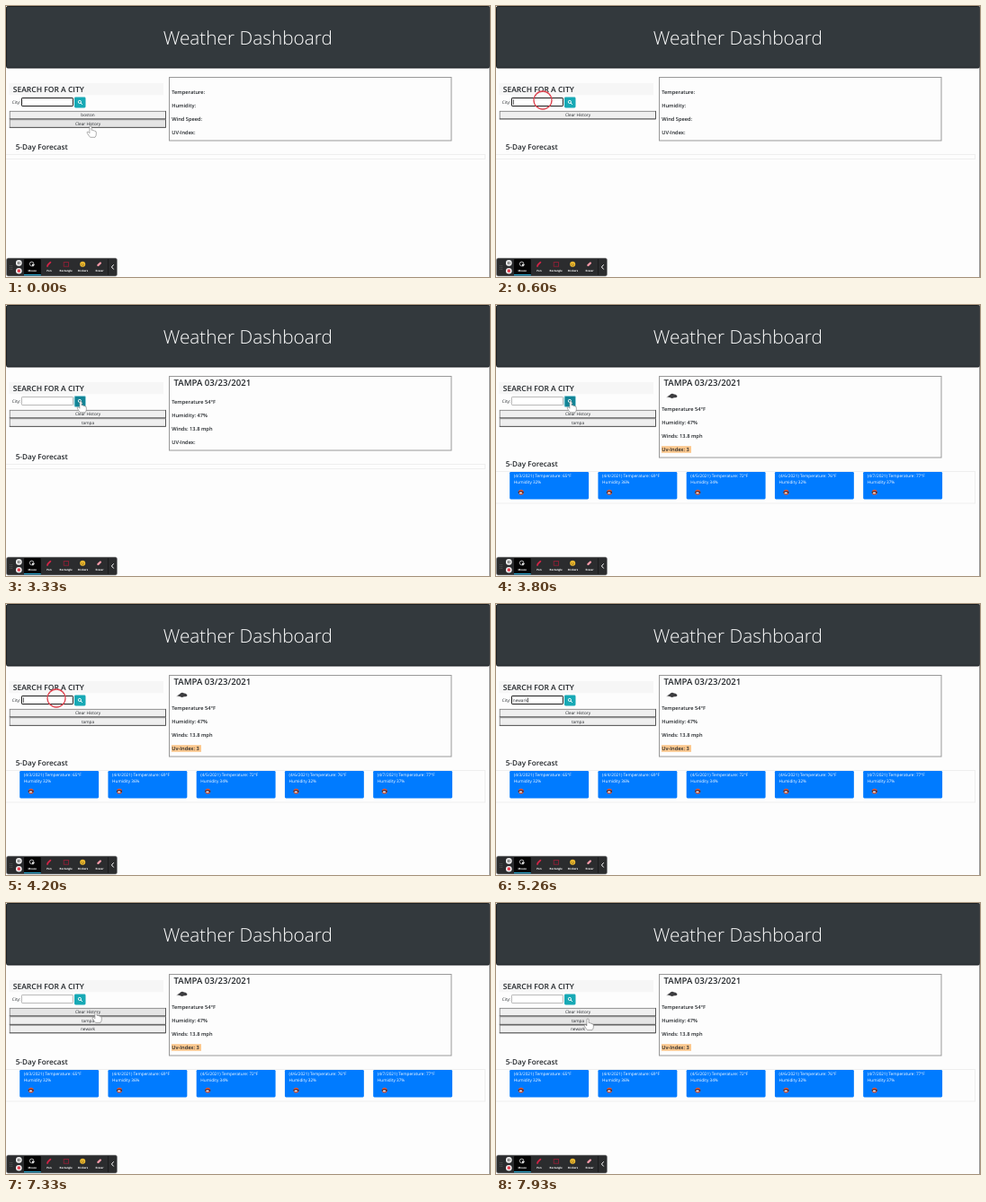
Write an HTML page that moves like this. It is 538 px wide and 302 px high and loops after 8 s.

```html
<!DOCTYPE html>
<html lang="en">
<head>
<meta charset="utf-8">
<title>Weather Dashboard</title>
<style>
  html, body { margin: 0; width: 100%; height: 100%; overflow: hidden; background: #fdfdfd; }
  svg { display: block; }
  text { font-family: "Open Sans", "Noto Sans", sans-serif; text-rendering: geometricPrecision; white-space: pre; }
</style>
</head>
<body>
<svg id="stage" width="538" height="302" viewBox="0 0 538 302"></svg>
<script>
const LOOP = 8000;
const INK = '#212529';
const stage = document.getElementById('stage');

function el(parent, tag, attrs = {}, content) {
  const node = document.createElementNS('http://www.w3.org/2000/svg', tag);
  for (const k in attrs) node.setAttribute(k, attrs[k]);
  if (content !== undefined) node.textContent = content;
  return parent.appendChild(node);
}
const group = (parent = stage) => el(parent, 'g');
const rect = (p, x, y, width, height, fill, more) => el(p, 'rect', { x, y, width, height, fill, ...more });
const circle = (p, cx, cy, r, fill, more) => el(p, 'circle', { cx, cy, r, fill, ...more });
const path = (p, d, fill, more) => el(p, 'path', { d, fill, ...more });
const text = (p, x, y, size, str, weight = 400, fill = INK, anchor = 'start') =>
  el(p, 'text', { x, y, 'font-size': size, 'font-weight': weight, fill, 'text-anchor': anchor }, str);
const line = (p, d, stroke, width) =>
  path(p, d, 'none', { stroke, 'stroke-width': width, 'stroke-linecap': 'round', 'stroke-linejoin': 'round' });
const show = (node, on) => node.setAttribute('visibility', on ? 'visible' : 'hidden');

// Header and search form
rect(stage, 0, 0, 538, 302, '#fdfdfd');
rect(stage, 0.5, 0.5, 537, 68.5, '#33393d', { rx: 1.6, stroke: '#1b1f22' });
text(stage, 268.8, 43, 20.8, 'Weather Dashboard', 300, '#fff', 'middle');
rect(stage, 3.5, 86, 171.5, 13.3, '#f6f6f6');
text(stage, 7.8, 96, 8.5, 'SEARCH FOR A CITY', 600);
text(stage, 6.8, 109, 4.7, 'City:');
const input = rect(stage, 17.5, 102.5, 57, 9, '#fff', { rx: 0.6 });
const typed = text(stage, 18.8, 108.8, 4.7, '');
const caret = rect(stage, 0, 104.3, 0.6, 5.6, '#000');
const search = rect(stage, 76, 101.5, 12.5, 12, '#17a9b5', { rx: 1.4 });
circle(stage, 81.9, 106.9, 1.6, 'none', { stroke: '#fff', 'stroke-width': 0.9 });
line(stage, 'M83.2 108.2L84.6 109.6', '#fff', 1);

// History buttons
const rows = [0, 1, 2].map(i => {
  const g = group();
  const y = 117.3 + i * 9.45;
  const box = rect(g, 4.2, y, 173.3, 8.6, '#efefef', { stroke: '#777', 'stroke-width': 0.8 });
  line(g, `M4.2 ${y + 8.6}H177.5V${y}`, '#4a4a4a', 0.8);
  return { g, y, box, label: text(g, 91, y + 6, 4.7, '', 400, INK, 'middle') };
});

// Weather panel and forecast, one group per loading stage
function weather(dy, title, labels, loaded) {
  const g = group();
  rect(g, 181.5, 79.5, 313.5, 70.5 + dy, '#fdfdfd', { stroke: '#999' });
  text(g, 186.6, 89.6, 9.6, title, 600);
  if (loaded) {
    rect(g, 184, 157.2, 33, 7.6, '#fcc88e');
    el(g, 'ellipse', { cx: 191.6, cy: 103, rx: 2.8, ry: 1.4, fill: '#eee' });
    path(g, 'M190 102.2Q192 101.2 193.5 100Q195.5 98 198 99.4Q201.6 99.8 201.4 102.2Q200.5 103.6 198 103.2Q195 104.8 194 103.2Z', '#3d3d40');
  }
  labels.forEach((s, i) => text(g, 184.2, 98.4 + dy + i * 15, 5.7, s, 600));
  text(g, 10.7, 160 + dy, 8.2, '5-Day Forecast', 600);
  rect(g, -1, 165.5 + dy, 533.5, loaded ? 35.5 : 5, 'none', { stroke: '#efefef' });
  return g;
}

function card(g, i, temp, humidity) {
  const x = 15.2 + i * 98.25;
  rect(g, x, 186, 87.9, 30.4, '#007bff', { rx: 1.3 });
  text(g, x + 4.6, 191.8, 4.7, `(4/${i + 3}/2021) Temperature: ${temp}°F`, 400, '#fff');
  text(g, x + 4.6, 199, 4.7, `Humidity ${humidity}%`, 400, '#fff');
  circle(g, x + 12.6, 208.7, 2.9, '#e8562f');
  el(g, 'ellipse', { cx: x + 12.5, cy: 208.8, rx: 3.1, ry: 1.5, fill: '#4a2b35' });
  el(g, 'ellipse', { cx: x + 12.3, cy: 209.3, rx: 1.8, ry: 0.9, fill: '#f3e6e2' });
}

const readings = ['Temperature 54°F', 'Humidity: 47%', 'Winds: 13.8 mph'];
const city = 'TAMPA 03/23/2021';
const panels = [
  weather(0, '', ['Temperature:', 'Humidity:', 'Wind Speed:', 'UV-Index:']),
  weather(12, city, [...readings, 'UV-Index:']),
  weather(20, city, [...readings, 'Uv-Index: 3'], true)
];
[[65, 32], [69, 36], [72, 34], [76, 32], [77, 37]].forEach((d, i) => card(panels[2], i, ...d));

// Recorder toolbar
const bar = group();
rect(bar, 0.5, 281, 123, 20, '#2b2c2e', { rx: 2, stroke: '#8a8a8a', 'stroke-width': 0.6 });
for (let i = 0; i < 6; i++) circle(bar, 4.8 + (i % 2) * 1.6, 289.4 + (i >> 1) * 1.9, 0.4, '#999');
circle(bar, 14.3, 286.4, 3.3, '#f4f4f4');
line(bar, 'M13.4 285.2V287.6M15.2 285.2V287.6', '#333', 0.8);
circle(bar, 14.3, 295.2, 3.3, '#f4f4f4');
rect(bar, 12.7, 293.6, 3.2, 3.2, '#e23b4b', { rx: 0.4 });
rect(bar, 20, 282, 18.8, 18, '#050505', { rx: 1 });
rect(bar, 20, 299, 18.8, 1.3, '#2aa3c9');
['Mouse', 'Pen', 'Rectangle', 'Stickers', 'Eraser'].forEach((s, i) =>
  text(bar, 29.3 + i * 18.7, 296.2, 2.9, s, 700, '#fff', 'middle'));
circle(bar, 28.6, 287.4, 2.3, 'none', { stroke: '#fff', 'stroke-width': 0.7 });
path(bar, 'M28.6 287.2L32.2 288.6L30.6 289.2L30 290.9Z', '#fff');
line(bar, 'M46 290L46.6 288.4L49.4 285.6', '#d42447', 1.8);
rect(bar, 64.2, 285.6, 5.4, 4.6, 'none', { stroke: '#9c1d36', 'stroke-width': 0.8 });
circle(bar, 85.2, 287.8, 3, '#f7c331');
line(bar, 'M83.7 288.6Q85.2 290.2 86.7 288.6M84.2 286.8V287M86.2 286.8V287', '#5b3a10', 0.6);
line(bar, 'M102.4 288.9L104.9 286.5', '#f39aa8', 2.3);
rect(bar, 113, 282, 0.6, 18, '#111');
line(bar, 'M119.4 288.6L117.4 290.9L119.4 293.2', '#fff', 1);
rect(stage, 537.4, 0, 0.6, 302, '#555');

// Pointers
const ring = circle(stage, 0, 0, 10, 'none', { stroke: '#dd4450', 'stroke-width': 1.3 });
const pointer = group();
const outline = { stroke: '#777', 'stroke-width': 0.6, 'stroke-linejoin': 'round' };
const shapes = {
  hand: path(pointer, 'M-1.1 .9C-1.1-.4 1.1-.4 1.1 .9V4.6Q2.6 4 3 5.2Q4.5 4.6 4.9 5.9Q6.3 5.5 6.3 7.2V9.2Q6.2 11.2 5 12.6H-.4Q-2.4 10.4-3.7 8Q-4.5 6.2-2.6 6.5L-1.1 8Z', '#fff', outline),
  arrow: path(pointer, 'M0 0V9.5L2.2 7.5L3.7 10.8L5.2 10.1L3.8 7H6.8Z', '#fff', outline),
  beam: line(pointer, 'M-1.2-3.2H1.2M0-3.2V3.2M-1.2 3.2H1.2', '#333', 0.6)
};

// Timeline: [time, value...]
const history = [
  [0, ['boston', 'Clear History']],
  [200, ['Clear History']],
  [3130, ['Clear History', 'tampa']],
  [6530, ['Clear History', 'tampa', 'newark']]
];
const phase = [[0, 0], [3130, 1], [3460, 2]];
const focus = [[0, 'start'], [200, ''], [600, 'input'], [3060, 'search'], [4130, 'input'], [6400, 'search'], [7000, '']];
const keys = [
  [0, ''], [600, ''], [1460, 't'], [1660, 'ta'], [1860, 'tam'], [2000, 'tamp'], [2200, 'tampa'], [3130, ''],
  [4130, ''], [4860, 'n'], [4930, 'ne'], [5000, 'new'], [5060, 'newa'], [5200, 'newar'], [5260, 'newark'], [6530, '']
];
const moves = [
  [0, 94, 133.7], [60, 94, 133.7], [200, 93, 131], [580, 52, 105], [2860, 52, 105], [3030, 83, 107.2],
  [3800, 83, 107.2], [4080, 56, 105], [6130, 56, 105], [6340, 83, 107.2],
  [7000, 83, 107.2], [7460, 104, 124], [7800, 104, 124], [7930, 102, 129]
];
const clicks = [[600, 300], [4130, 200]];
const hidden = [[0, false], [600, true], [2860, false], [4130, true], [6130, false]];

const at = (table, t) => table.reduce((hit, row) => (row[0] <= t ? row : hit));

function position(t) {
  const i = moves.findIndex(m => m[0] > t);
  if (i < 0) return moves[moves.length - 1].slice(1);
  const [a, b] = [moves[i - 1], moves[i]];
  const p = (t - a[0]) / (b[0] - a[0]);
  const e = p * p * (3 - 2 * p);
  return [a[1] + (b[1] - a[1]) * e, a[2] + (b[2] - a[2]) * e];
}

function render(t) {
  const [x, y] = position(t);
  const off = at(hidden, t)[1];
  const names = at(history, t)[1];
  const active = at(focus, t)[1];
  const [keyTime, word] = at(keys, t);
  const inside = (l, top, w, h) => !off && x >= l && x <= l + w && y >= top && y <= top + h;

  let over = inside(17, 102, 57, 10) ? 'beam' : 'arrow';
  rows.forEach((row, i) => {
    const hover = i < names.length && inside(4, row.y, 174, 9);
    if (hover) over = 'hand';
    show(row.g, i < names.length);
    row.label.textContent = names[i] || '';
    row.box.setAttribute('fill', hover ? '#e5e5e5' : '#efefef');
  });

  const onSearch = inside(76, 101.5, 12.5, 12);
  if (onSearch) over = 'hand';
  search.setAttribute('fill', onSearch ? '#138496' : '#17a9b5');
  search.setAttribute('stroke', active === 'search' ? '#8fd0da' : 'none');

  const focused = active === 'input' || active === 'start';
  input.setAttribute('stroke', focused ? '#1c1c1c' : '#a8a8a8');
  input.setAttribute('stroke-width', focused ? 1 : 0.8);
  typed.textContent = word;
  caret.setAttribute('x', 19.1 + (word ? typed.getComputedTextLength() : 0));
  show(caret, active === 'input' && (t - keyTime) % 1060 < 530);

  panels.forEach((g, i) => show(g, i === at(phase, t)[1]));

  const click = clicks.find(([start, length]) => t >= start && t < start + length);
  show(ring, click);
  ring.setAttribute('cx', x);
  ring.setAttribute('cy', y);
  pointer.setAttribute('transform', `translate(${x} ${y})`);
  for (const k in shapes) show(shapes[k], !off && k === over);
}

const start = performance.now();
function tick() {
  render((performance.now() - start) % LOOP);
  requestAnimationFrame(tick);
}
tick();
</script>
</body>
</html>
```
